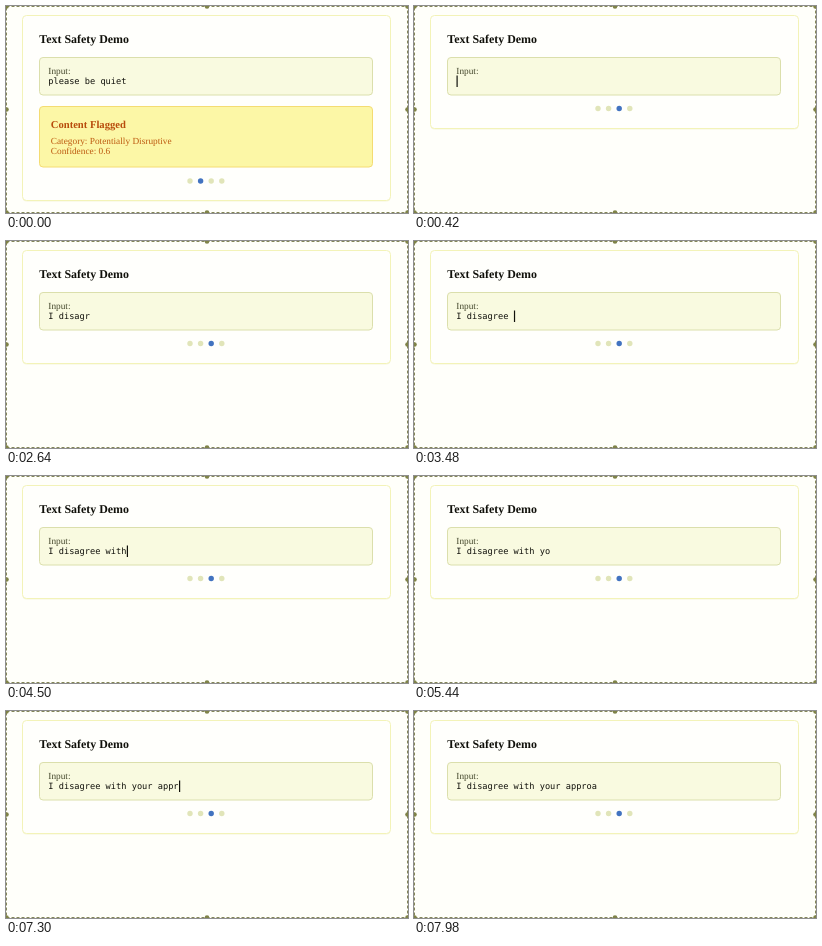
These frames come from a looping animation (402 px wide and 207 px high, 8000 ms). An HTML page:

```html
<!DOCTYPE html>
<html lang="en">
<head>
<meta charset="utf-8">
<title>Text Safety Demo</title>
<style>
  html, body { margin: 0; width: 100%; height: 100%; overflow: hidden; background: #fffffa; }
  svg { display: block; width: 402px; height: 207px; }
  text { font-family: "Liberation Serif", serif; font-size: 9.3px; text-rendering: geometricPrecision; white-space: pre; }
  .title { font-size: 11.95px; font-weight: bold; fill: #10100a; }
  .label { fill: #45482c; }
  .typed { font-family: "DejaVu Sans Mono", monospace; font-size: 8.67px; fill: #10100a; }
  .flag text { fill: #bd5a10; }
  .flag .head { font-size: 10.6px; font-weight: bold; fill: #b84c0c; }
  .frame { fill: none; stroke: #85875a; stroke-dasharray: 3 2; }
  .handles { fill: #7f8348; }
  .card { fill: #fffffc; stroke: #f3f3b8; }
  .shadow { fill: #f6f6dc; }
  .input { fill: #f9fae0; stroke: #dbdfac; }
  .result { fill: #fcf7a6; stroke: #f4dc72; }
  .dots { fill: #e1e5b9; }
  .dots .active { fill: #4273c0; }
</style>
</head>
<body>
<svg viewBox="0 0 402 207">
  <rect class="frame" x=".5" y=".5" width="401" height="206"/>
  <g class="handles" id="handles"></g>
  <rect class="shadow" id="shadow" x="16.5" y="11.5" width="368" rx="4"/>
  <rect class="card" id="card" x="16.5" y="9.5" width="368" rx="4"/>
  <text class="title" x="33.3" y="37">Text Safety Demo</text>
  <rect class="input" x="33.5" y="51.5" width="333" height="37.5" rx="3.5"/>
  <text class="label" x="42.3" y="68">Input:</text>
  <text class="typed" id="typed" x="42.3" y="78"></text>
  <rect id="cursor" y="69.5" width="1.2" height="11.5" fill="#10100a"/>
  <g class="flag" id="flag">
    <rect class="result" x="33.5" y="100.5" width="333" height="60.5" rx="3.5"/>
    <text class="head" x="44.8" y="122">Content Flagged</text>
    <text x="44.8" y="138">Category: Potentially Disruptive</text>
    <text x="44.8" y="148">Confidence: 0.6</text>
  </g>
  <g class="dots" id="dots"></g>
</svg>
<script>
  const LOOP = 8000, SLIDE = 420, KEY = 280, BLINK = 1400;
  const CHAR = 5.22, TEXT_X = 42.3;
  const FIRST = 'please be quiet', SECOND = 'I disagree with your approa';
  const $ = id => document.getElementById(id);

  function circle(parent, cx, cy, r) {
    const c = document.createElementNS('http://www.w3.org/2000/svg', 'circle');
    for (const [k, v] of Object.entries({ cx, cy, r })) c.setAttribute(k, v);
    return parent.appendChild(c);
  }

  for (const x of [0.5, 201, 401.5])
    for (const y of [0.5, 103.5, 206.5])
      if (x !== 201 || y !== 103.5) circle($('handles'), x, y, 2.3);

  const dots = [0, 1, 2, 3].map(i => circle($('dots'), 184 + i * 10.6, 102.5, 2.7));

  // Typing falls one tick behind after the sixth letter.
  function typedCount(t) {
    const lag = t >= 2100 ? 40 : 20;
    return Math.max(0, Math.min(SECOND.length, Math.floor((t - 140 - lag) / KEY)));
  }

  function cursorOn(t) {
    const start = t >= 2100 ? SLIDE + 20 : SLIDE;
    return Math.floor((t - start) / BLINK) % 2 === 0;
  }

  function draw(t) {
    const flagged = t < SLIDE;
    const count = flagged ? 0 : typedCount(t);
    const height = flagged ? 185 : 113;
    $('typed').textContent = flagged ? FIRST : SECOND.slice(0, count);
    $('flag').style.display = flagged ? '' : 'none';
    $('cursor').style.display = !flagged && cursorOn(t) ? '' : 'none';
    $('cursor').setAttribute('x', TEXT_X + count * CHAR + 0.2);
    $('card').setAttribute('height', height);
    $('shadow').setAttribute('height', height - 1);
    $('dots').setAttribute('transform', `translate(0 ${flagged ? 72.5 : 0})`);
    dots.forEach((dot, i) => dot.classList.toggle('active', i === (flagged ? 1 : 2)));
  }

  const begin = performance.now();
  function tick() {
    draw((performance.now() - begin) % LOOP);
    requestAnimationFrame(tick);
  }
  tick();
</script>
</body>
</html>
```
